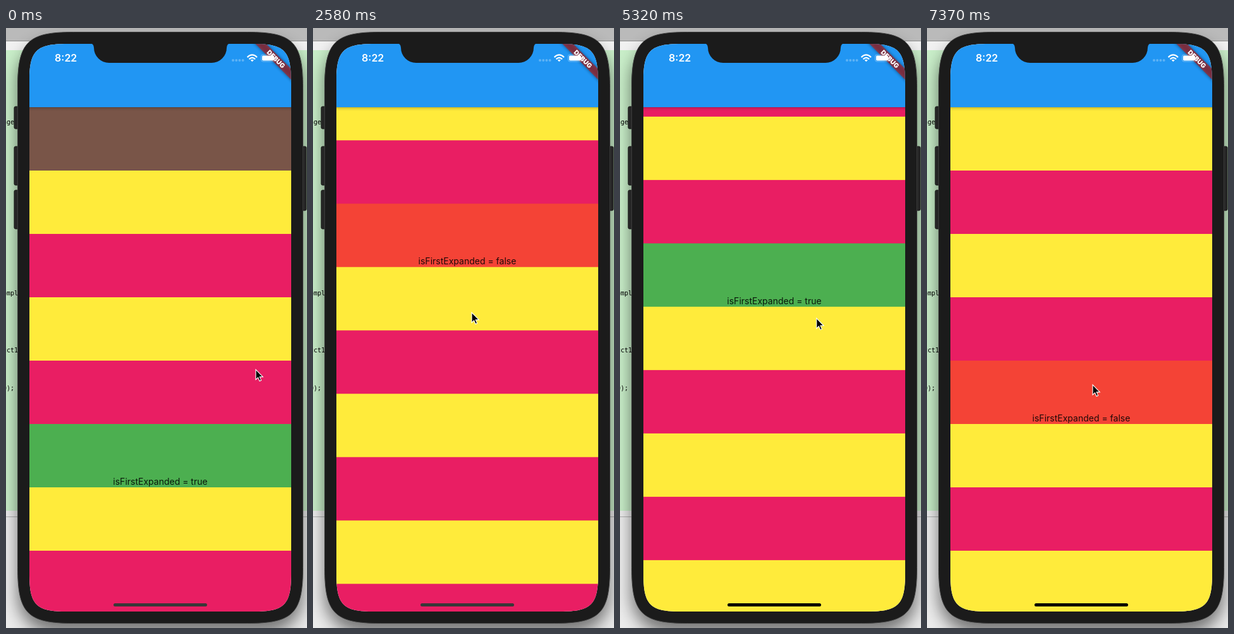
These frames come from a looping animation (476 by 947 pixels, 8000 ms). An HTML page:

```html
<!DOCTYPE html>
<html lang="en">
<head>
<meta charset="utf-8">
<title>Expandable list</title>
<style>
  html, body { margin: 0; width: 100%; height: 100%; overflow: hidden; background: #e4e4e4; }
  svg { display: block; width: 100%; height: 100%; }
  .ui { font-family: Inter, Roboto, sans-serif; text-anchor: middle; }
  .code { font: 10px "DejaVu Sans Mono", monospace; text-anchor: end; }
</style>
</head>
<body>
<svg viewBox="0 0 476 947" xmlns="http://www.w3.org/2000/svg">
  <defs>
    <clipPath id="screen"><path id="glass"/></clipPath>
    <clipPath id="body"><rect x="37" y="125" width="414" height="796"/></clipPath>
    <filter id="soft" x="-20%" y="-20%" width="140%" height="140%"><feGaussianBlur stdDeviation="13"/></filter>
    <filter id="glow" x="-20%" y="-60%" width="140%" height="220%"><feGaussianBlur stdDeviation="2.5"/></filter>
    <linearGradient id="drop" x1="0" y1="0" x2="0" y2="1">
      <stop offset="0" stop-opacity=".23"/>
      <stop offset=".4" stop-opacity=".09"/>
      <stop offset="1" stop-opacity="0"/>
    </linearGradient>
  </defs>

  <!-- Editor behind the phone -->
  <rect width="476" height="947" fill="#ececec"/>
  <rect width="476" height="20" fill="#bababa"/>
  <rect y="20" width="476" height="1" fill="#8e8e8e"/>
  <rect y="21" width="476" height="14" fill="#f1f1f1"/>
  <rect y="35" width="476" height="727" fill="#c9eec9"/>
  <rect y="771" width="476" height="1" fill="#b0b0b0"/>
  <rect x="18" y="22" width="452" height="934" rx="60" opacity=".5" filter="url(#soft)"/>
  <g class="code">
    <text x="13" y="152">age</text>
    <text x="19" y="422">ompl</text>
    <text x="19" y="512">uct1</text>
    <text x="13" y="572">0);</text>
  </g>

  <!-- Phone body -->
  <g fill="#262626" stroke="#151515">
    <rect x="13" y="124" width="9" height="35" rx="2"/>
    <rect x="13" y="187" width="9" height="61" rx="2"/>
    <rect x="13" y="256" width="9" height="61" rx="2"/>
    <rect x="466" y="187" width="9" height="101" rx="2"/>
  </g>
  <path id="shell" fill="#1b1b1b" stroke="#3c3c3c"/>

  <g clip-path="url(#screen)">
    <rect x="37" y="25" width="414" height="896" fill="#fafafa"/>
    <g clip-path="url(#body)">
      <g id="list"></g>
      <rect x="37" y="125" width="414" height="6" fill="url(#drop)"/>
    </g>
    <rect x="37" y="25" width="414" height="100" fill="#2196f3"/>
    <g transform="translate(451 25) rotate(45)">
      <rect x="-60" y="28" width="120" height="12" opacity=".5" filter="url(#glow)"/>
      <rect x="-60" y="28" width="120" height="12" fill="#b71c1c" fill-opacity=".627"/>
      <text class="ui" y="37.7" font-size="10.2" font-weight="900" fill="#fff">DEBUG</text>
    </g>
    <rect id="home" x="170" y="908" width="148" height="5" rx="2.5"/>
  </g>

  <!-- Notch and status bar -->
  <path d="M133 24A6 7 0 0 1 139 31A24 24 0 0 0 163 55H325A24 24 0 0 0 349 31A6 7 0 0 1 355 24Z" fill="#1b1b1b"/>
  <text class="ui" x="94.7" y="53.3" font-size="16" font-weight="600" fill="#fff">8:22</text>
  <g fill="#fff" fill-opacity=".28">
    <circle cx="359" cy="51" r="2"/><circle cx="364.2" cy="51" r="2"/>
    <circle cx="369.4" cy="51" r="2"/><circle cx="374.6" cy="51" r="2"/>
  </g>
  <g fill="none" stroke="#fff" stroke-width="2.2">
    <path d="M381.6 46.2Q389.3 38.6 397 46.2"/>
    <path d="M384.5 49.2Q389.3 44.6 394.1 49.2"/>
    <path d="M386.8 50.8Q389.3 48.6 391.8 50.8L389.3 53.3Z" fill="#fff" stroke="none"/>
  </g>
  <rect x="403.5" y="42" width="22" height="11" rx="3" fill="none" stroke="#fff" stroke-opacity=".35"/>
  <rect x="405" y="43.5" width="19" height="8" rx="1.8" fill="#fff"/>
  <path d="M427 45.5Q429 47.5 427 49.5Z" fill="#fff" fill-opacity=".4"/>

  <path id="cursor" d="M1 1V17L4.6 13.6L7 19.2L9.6 18.1L7.2 12.6H12.3Z" stroke="#fff" stroke-width="1.1"/>
</svg>

<script>
const LOOP = 8000, ROW = 100;
const BLUSH = '#e91e63', SUN = '#ffeb3b', GREEN = '#4caf50', RED = '#f44336', BROWN = '#795548';
const byId = id => document.getElementById(id);
const list = byId('list'), home = byId('home'), cursor = byId('cursor');

// Rectangle with continuous corners: the curve reaches further than a plain arc.
function squircle(x, y, w, h, r) {
  const e = 1.528 * r, c = .272 * r, k = e - c;
  return `M${x} ${y + e}c0 ${-k} ${c} ${-e} ${e} ${-e}h${w - 2 * e}`
    + `c${k} 0 ${e} ${c} ${e} ${e}v${h - 2 * e}`
    + `c0 ${k} ${-c} ${e} ${-e} ${e}h${2 * e - w}`
    + `c${-k} 0 ${-e} ${-c} ${-e} ${-e}Z`;
}
byId('glass').setAttribute('d', squircle(37, 25, 414, 896, 39));
byId('shell').setAttribute('d', squircle(18.5, 6.5, 451, 933, 57.5));

function add(name, attrs) {
  const el = list.appendChild(document.createElementNS('http://www.w3.org/2000/svg', name));
  for (const key in attrs) el.setAttribute(key, attrs[key]);
  return el;
}

// Each row reaches one pixel under the next, so no seam shows between them.
const band = (n, fill) => add('rect', { x: 37, y: n * ROW, width: 414, height: ROW + 1, fill });
const stripe = n => n > 0 === (n % 2 !== 0) ? SUN : BLUSH;

// Rows are placed relative to the toggle row, which is row 0.
const extra = band(-5, BROWN);
for (let n = -4; n < 0; n++) band(n, stripe(n));
const toggle = band(0, GREEN);
const label = add('text', { class: 'ui', x: 244, y: 96, 'font-size': 14, 'fill-opacity': .87 });
for (let n = 1; n <= 9; n++) band(n, stripe(n));

const progress = (t, from, to) => Math.min(1, Math.max(0, (t - from) / (to - from)));
const mix = (a, b, u) => a + (b - a) * u;
const easeOut = u => 1 - (1 - u) ** 2;
const easeInOut = u => u * u * (3 - 2 * u);

// Pointer moves: start, end, and the place reached.
const moves = [
  [120, 770, 375, 669], [1500, 1760, 360, 731], [1920, 2580, 250, 448],
  [2700, 3270, 256, 349], [3270, 3530, 271, 185], [4000, 4200, 271, 196],
  [4300, 4640, 304, 404], [4640, 4800, 307, 344], [5200, 5640, 322, 955],
  [6100, 7140, 261, 562]
];

function pointer(t) {
  let x = 394, y = 538;
  for (const [from, to, toX, toY] of moves) {
    const u = easeInOut(progress(t, from, to));
    x = mix(x, toX, u);
    y = mix(y, toY, u);
  }
  return [x, y];
}

const COLLAPSE = 1270, EXPAND = 4040, COLLAPSE_AGAIN = 7310, RELEASE = 5760;
const FIRST = 625, REST = 525, SCROLLED = 149.4, PULLED = 628;

function toggleTop(t) {
  if (t < COLLAPSE) return FIRST;
  if (t < EXPAND) return mix(REST, SCROLLED, easeOut(progress(t, 2000, 3395)));
  if (t < RELEASE) return mix(SCROLLED, PULLED, easeOut(progress(t, 5200, 5740)));
  const p = 14.14 * (t - RELEASE) / 1000; // critically damped spring
  return mix(REST, PULLED, (1 + p) * Math.exp(-p));
}

function render(t) {
  const top = toggleTop(t);
  const open = t < COLLAPSE || (t >= EXPAND && t < COLLAPSE_AGAIN);
  list.setAttribute('transform', `translate(0 ${top.toFixed(1)})`);
  extra.setAttribute('visibility', t < COLLAPSE ? 'visible' : 'hidden');
  toggle.setAttribute('fill', open ? GREEN : RED);
  label.textContent = `isFirstExpanded = ${open}`;

  // The home bar is black on yellow rows and softer on dark ones.
  const under = Math.floor((910 - top) / ROW);
  home.setAttribute('fill', stripe(under) === SUN ? '#000' : '#383838');

  const [x, y] = pointer(t);
  cursor.setAttribute('transform', `translate(${x.toFixed(1)} ${y.toFixed(1)})`);
}

const start = performance.now();
function tick() {
  render((performance.now() - start) % LOOP);
  requestAnimationFrame(tick);
}
tick();
</script>
</body>
</html>
```
